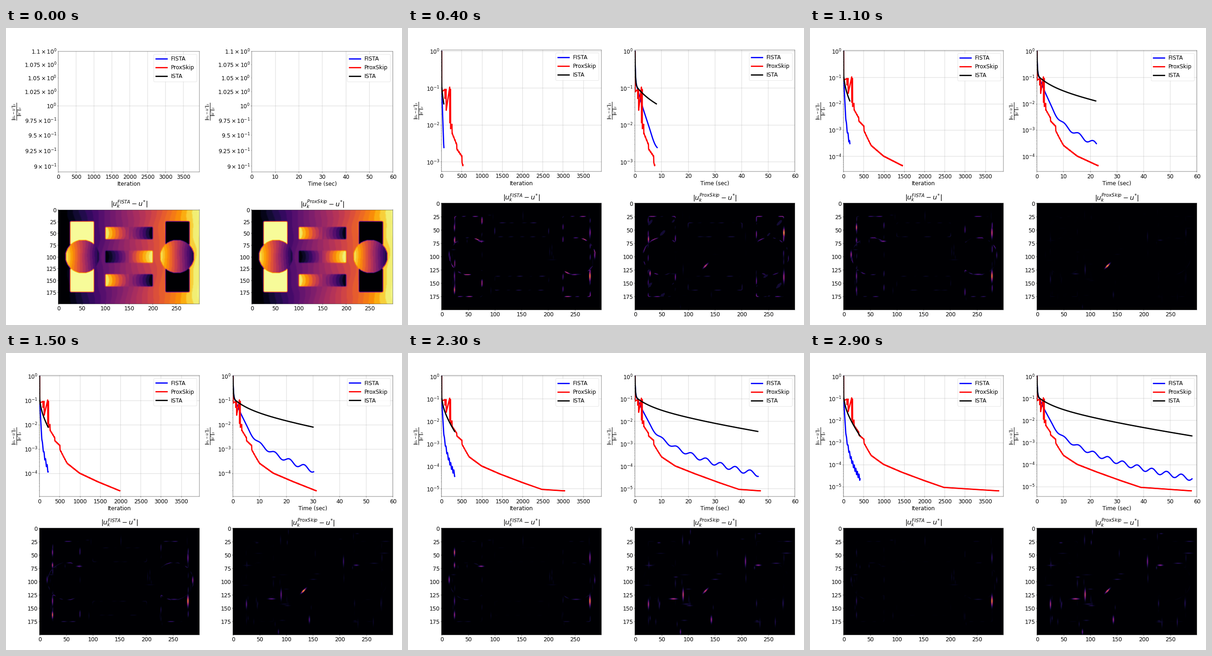
A matplotlib script for the animation above (3 s loop, 864x648 px).

```python
import numpy as np
import matplotlib.pyplot as plt
from matplotlib.animation import FuncAnimation

W, H, DPI = 864, 648, 43.2
FRAMES = 30
plt.rcParams.update({"font.family": "DejaVu Sans", "font.size": 20})
fig, axes = plt.subplots(2, 2, figsize=(20, 15), dpi=DPI)
X, Y = np.meshgrid(np.arange(300.0), np.arange(200.0))

# iteration, log10 error before and after each early jump
JUMPS = [(4, 0, -1.1), (84, -1.03, -1.28), (113, -1.03, -1.6), (202, -.97, -1.94),
         (222, -1.03, -2.1), (258, -1.97, -2.22), (375, -2.53, -2.65), (503, -2.85, -3.02)]
# iteration, log10 error of the smooth tail
TAIL = [(503, -3.02), (590, -3.3), (680, -3.58), (985, -3.985), (1436, -4.34),
        (1975, -4.71), (2477, -5.03), (3830, -5.187)]
# iteration, seconds
CLOCK = [(0, 0), (200, 2.4), (528, 7.4), (1452, 22.9), (2640, 41.6), (3828, 57.9)]

# x, y, length (negative: horizontal) of the bright spots
SPOTS_F = [(278, 136, 6), (278, 55, 6), (24, 162, 4), (24, 45, 4), (24, 136, 5),
           (24, 69, 3), (14, 96, 4), (287, 97, 4), (74, 71, -3), (252, 133, -5)]
EARLY_P = [(279, 55, 5), (25, 67, 4), (28, 131, 3), (279, 138, 7)]
LATE_P = [(90, 124, 6), (72, 132, -4), (25, 142, 5), (143, 171, 4),
          (231, 69, -3), (207, 62, 6), (85, 194, 3)]


def fall(t, tau):
    return np.exp(-t / tau)


def ista(t):
    return (-.9 * (1 - fall(t, .17)) - .3 * (1 - fall(t, 4.8))
            - .018 * t - .5 * (1 - fall(t, 25)))


def fista(t):
    trend = .78 - 1.3 * np.log(5.5 + t)
    start = .79 * fall(t, .15) + .65 * np.exp(-(t / 5.2) ** 2)
    ripple = .11 * (1 - fall(t, 13)) * np.cos(2 * np.pi * (t - 26.7) / 5.5)
    return trend + start + ripple


def prox(it):
    points = [(0, 0)]
    for at, before, after in JUMPS:
        points += [(at - 1, before), (at + 2, after)]
    xs, ys = np.array(points + TAIL[1:]).T
    saw = np.where(it > 250, .5 - (it / 33) % 1, 0)
    return np.interp(it, xs, ys) + saw * np.interp(it, [250, 2700], [.03, .006])


def steps(v, n):
    return (np.floor(v * n) + .5) / n


def squares(cx):
    dx = np.abs(X - cx) / 25.5
    dy = np.abs(np.abs(Y - 99.5) - 50) / 25.5
    return dx ** 18 + dy ** 18 < 1


def circle(cx):
    return ((X - cx) / 36) ** 2 + ((Y - 99) / 35) ** 2 < 1


def bars(row):
    return (np.abs(X - 150) / 50.5) ** 40 + (np.abs(Y - 50 * row - 49.5) / 13) ** 10 < 1


def start_image():
    wob = 4 * np.sin(Y * .045 + 1 + X * .02) + 2 * np.sin(Y * .1 + X * .05)
    ground = np.interp(steps((X + wob) / 300, 25) * 300,
                       [20, 33, 100, 180, 259, 297], [0, .06, .28, .5, .75, .97])
    img = ground.copy()
    for row in range(3):
        bend = .15 * (np.abs(Y - 50 * row - 49.5) / 12) ** 3
        mix = steps(np.clip(np.abs(X - 150) / 50 - bend * .5, 0, .99), 7)
        end = np.where((X < 150) == (row != 1), .98, 0)
        img = np.where(bars(row), ground + mix * (end - ground), img)
    img[squares(50)] = .985
    img[squares(253)] = 0
    for cx in (51, 252):
        u = (X - cx) / 72 * (1 - .25 * ((Y - 99) / 35) ** 2)
        u = steps(u + .006 * np.sin(Y * .15 + X * .1), 14)
        img = np.where(circle(cx), .51 - .87 * u, img)
    pad = np.pad(img, 1, mode="edge")
    return sum(pad[i:i + 200, j:j + 300] for i in range(3) for j in range(3)) / 9


def outlines():
    balls = circle(51) | circle(252)
    blocks = squares(50) | squares(253)
    outer = (X < 25) | (X > 278)
    parts = [(blocks & ~balls, 1), ((balls | blocks) & outer, .8)]
    parts += [(bars(r), .3) for r in (0, 2)]
    edge = np.zeros_like(X)
    for mask, weight in parts:
        gy, gx = np.gradient(mask.astype(float))
        edge = np.maximum(edge, weight * np.hypot(gx, gy))
    return edge * 2


START, EDGE = start_image(), outlines()


def patches(k, phase):
    n = (np.sin(X * .13 + phase + .2 * k) * np.sin(Y * .16 - phase + .15 * k)
         + .7 * np.sin(X * .31 + Y * .27 + 2 * phase - .3 * k))
    return np.clip(n + .1, 0, 1.4)


def streak(x, y, length, width=.8):
    sx, sy = (width, length) if length > 0 else (-length, width)
    return np.exp(-.5 * (((X - x) / sx) ** 2 + ((Y - y) / sy) ** 2))


def strongest(spots, power):
    return np.max([p * streak(*s) for s, p in zip(spots, power)], axis=0)


def scatter(seed, n):
    """Faint streaks lying on and around the outlines."""
    rng = np.random.default_rng(seed)
    xs = [25, 45, 75, 90, 100, 155, 207, 230, 262, 279]
    ys = [12, 26, 48, 68, 90, 105, 133, 140, 172]
    spots = [(rng.choice(xs) + rng.normal(0, 3), rng.choice(ys) + rng.normal(0, 4),
              rng.uniform(2, 6) * rng.choice([1, 1, -1]), .7) for _ in range(n)]
    return strongest(spots, rng.uniform(.06, .18, n))


FAINT_F, FAINT_P = scatter(4, 20), scatter(9, 45)


def fista_error(k):
    level = .42 * fall(k, 11)
    img = np.maximum(level * EDGE * patches(k, 1.0), .5 * FAINT_F)
    # every spot but the first flickers and dies out
    i = np.arange(len(SPOTS_F))
    power = (.85 - .05 * i) * (.7 + .3 * np.sin(.6 * k + 2.4 * i))
    power *= np.interp(k, [23, 29], [1, .25])
    power[0] = .9
    return np.maximum(img, strongest(SPOTS_F, power))


def prox_error(k):
    fade = np.interp(k, [4, 10], [1, .08])
    grow = np.interp(k, [4, 11, 20], [.1, .2, 1])
    img = np.maximum(.22 * fade * EDGE * patches(k, 2.6), grow * FAINT_P)
    img = np.maximum(img, strongest(EARLY_P, fade * np.array([1, .65, .6, .5])))
    img = np.maximum(img, strongest(LATE_P, grow * np.linspace(.65, .35, len(LATE_P))))
    u, v = (X - 132) * .8 - (Y - 117) * .6, (X - 132) * .6 + (Y - 117) * .8
    power = np.interp(k, [4, 11, 15, 20, 29], [.65, 1, 1, .6, .75])
    img = np.maximum(img, power * np.exp(-.5 * (v ** 2 + ((u + 2 * v) / 3) ** 2)))
    blocks = (squares(50) | squares(253)) & ~circle(51) & ~circle(252)
    return np.maximum(img, .09 * fade * (blocks & (patches(0, 4.2) > 1.35)))


def place(ax, left, top, right, bottom):
    ax.set_position([left / W, 1 - bottom / H, (right - left) / W, (bottom - top) / H])


def histories(k):
    """(colour, name, iterations, seconds, log error) for each method."""
    t_f = np.linspace(0, .35 * min(k, 1) + 1.993 * k, 1 + 40 * k)
    t_i = np.linspace(0, 2.003 * k, 1 + 40 * k)
    it = np.arange(0, 132 * k + 1)
    t_p = np.interp(it, *np.array(CLOCK).T)
    return [("blue", "FISTA", t_f * 7, t_f, fista(t_f)),
            ("red", "ProxSkip", it, t_p, prox(it)),
            ("black", "ISTA", t_i * 7, t_i, ista(t_i))]


def draw_plot(ax, k, right, column, xmax, xticks, xlabel):
    ax.clear()
    runs = histories(k)
    for run in runs:
        ax.plot(run[column], 10 ** run[4], color=run[0], label=run[1], lw=4.5)
    ax.set_yscale("log")
    ax.set_xlim(0, xmax)
    ax.set_xticks(xticks)
    if k == 0:
        ax.set_ylim(10 ** -.0503, 1.1003)
        ax.set_yticks([1])
        ticks = [(v, -1) for v in (9, 9.25, 9.5, 9.75)]
        ticks += [(v, 0) for v in (1.025, 1.05, 1.075, 1.1)]
        labels = [rf"$\mathdefault{{{v:g}\times10^{{{p}}}}}$" for v, p in ticks]
        ax.set_yticks([v * 10.0 ** p for v, p in ticks], labels, minor=True)
        place(ax, right - 308, 50.5, right, 314.3)
    else:
        low = 1.05 * min(run[4].min() for run in runs)
        decade = 262.4 / -low
        ax.set_ylim(10 ** low, 1.1)
        place(ax, right - 349, 51 - .0414 * decade, right, 314.2 - .015 * decade)
    ax.grid(True)
    ax.set_xlabel(xlabel)
    ax.set_ylabel(r"$\frac{\|u_{k} - u^{*}\|_{2}}{\|u^{*}\|_{2}}$", fontsize=18.5)
    ax.legend(loc="upper right")


def draw_image(ax, k, right, name, error):
    ax.clear()
    ax.imshow(error(k) if k else START, cmap="inferno", vmin=0, vmax=1)
    ax.set_xticks(range(0, 300, 50))
    ax.set_yticks(range(0, 200, 25))
    ax.set_title(rf"$|u_{{k}}^{{{name}}} - u^{{*}}|$")
    if k:
        place(ax, right - 349, 382.2, right, 614.9)
    else:
        place(ax, right - 308, 396.5, right, 601.8)


def draw(k):
    draw_plot(axes[0, 0], k, 422.2, 2, 3947, range(0, 3501, 500), "Iteration")
    draw_plot(axes[0, 1], k, 844.2, 3, 60, range(0, 61, 10), "Time (sec)")
    draw_image(axes[1, 0], k, 422.2, "FISTA", fista_error)
    draw_image(axes[1, 1], k, 844.2, "ProxSkip", prox_error)


anim = FuncAnimation(fig, draw, frames=FRAMES, interval=100, repeat=True,
                     repeat_delay=0, blit=False)
plt.show()
```
